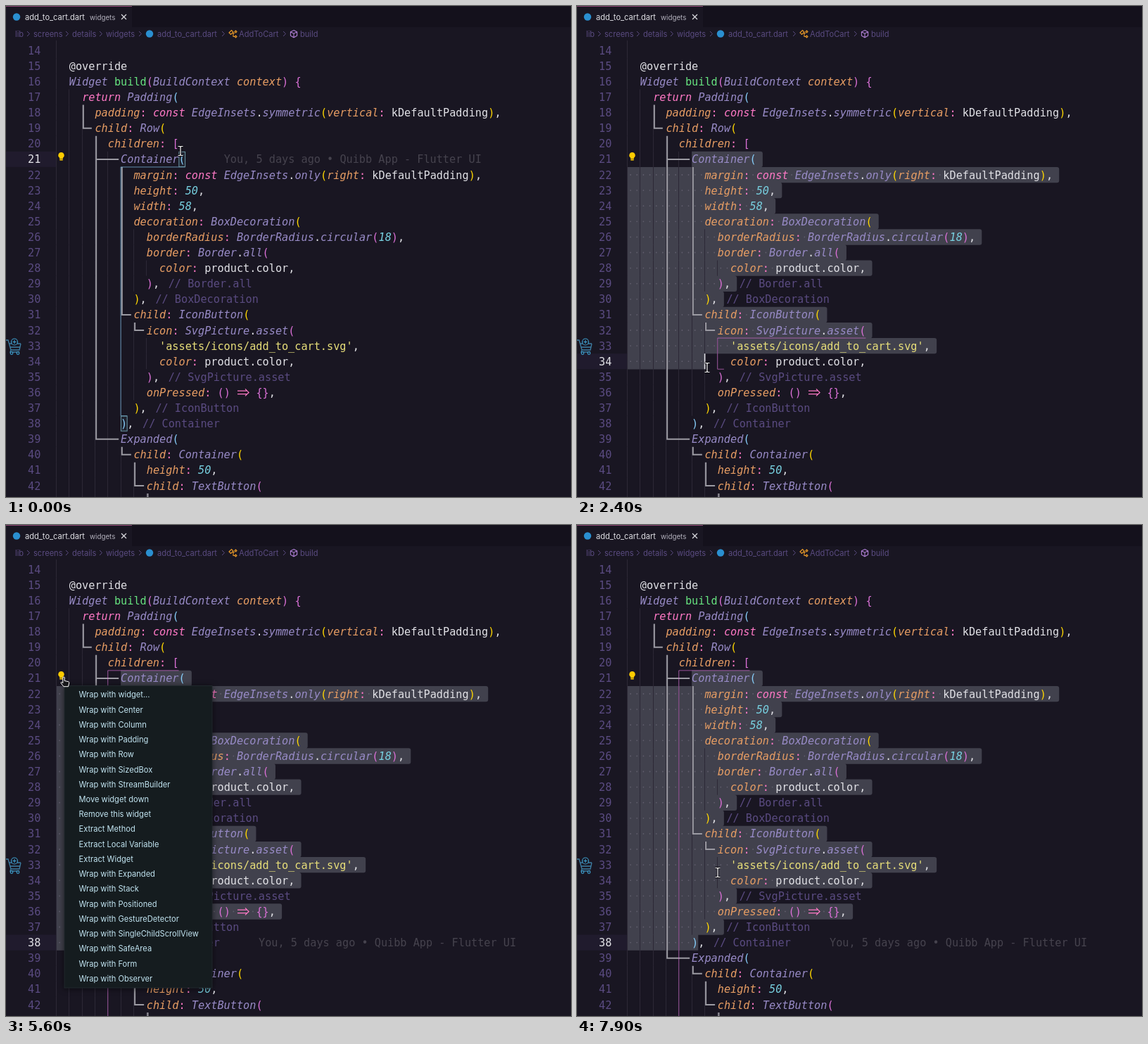
Animation of 803x698 px, one loop 8 s. Source, as an HTML page:

```html
<!DOCTYPE html>
<html lang="en">
<head>
<meta charset="utf-8">
<title>Editor</title>
<style>
  html, body { margin: 0; width: 100%; height: 100%; overflow: hidden; background: #191622; }
  svg { display: block; }
  .code { font: 15.215px "DejaVu Sans Mono", monospace; fill: #e1e1e6; }
  .ui { font: 11.1px Inter, sans-serif; }
  .it { font-style: italic; }
  .menu { filter: drop-shadow(0 1px 4px rgba(0, 0, 0, .6)); }
</style>
</head>
<body>
<svg id="stage" width="803" height="698" viewBox="0 0 803 698"></svg>
<script type="module">
const CHAR = 9.16, ROW = 22.1, LOOP = 8000, STEP = 100;
const X = col => 71.5 + col * CHAR;
const Y = line => 63.2 + (line - 14) * ROW;
const rowTop = line => Y(line) - ROW / 2;

const C = {
  text: '#e1e1e6', dim: '#5a4b81', type: '#988bc7', prop: '#e89e64', key: '#ff79c6',
  num: '#78d1e1', str: '#e7de79', fn: '#67e480', faint: '#46434e',
  gold: '#ffd700', orchid: '#da70d6', sky: '#87cefa'
};

// Lines 14 onward: indent, code, closing label
const code = [
  [0, ''],
  [2, '@override'],
  [2, 'Widget build(BuildContext context) {'],
  [4, 'return Padding('],
  [6, 'padding: const EdgeInsets.symmetric(vertical: kDefaultPadding),'],
  [6, 'child: Row('],
  [8, 'children: ['],
  [10, 'Container('],
  [12, 'margin: const EdgeInsets.only(right: kDefaultPadding),'],
  [12, 'height: 50,'],
  [12, 'width: 58,'],
  [12, 'decoration: BoxDecoration('],
  [14, 'borderRadius: BorderRadius.circular(18),'],
  [14, 'border: Border.all('],
  [16, 'color: product.color,'],
  [14, '),', 'Border.all'],
  [12, '),', 'BoxDecoration'],
  [12, 'child: IconButton('],
  [14, 'icon: SvgPicture.asset('],
  [16, "'assets/icons/add_to_cart.svg',"],
  [16, 'color: product.color,'],
  [14, '),', 'SvgPicture.asset'],
  [14, 'onPressed: () => {},'],
  [12, '),', 'IconButton'],
  [10, '),', 'Container'],
  [10, 'Expanded('],
  [12, 'child: Container('],
  [14, 'height: 50,'],
  [14, 'child: TextButton('],
  [16, 'onPressed: () => {},']
];
const row = line => code[line - 14];
const endCol = line => row(line)[0] + row(line)[1].length;

const menuItems = ['Wrap with widget...', 'Wrap with Center', 'Wrap with Column', 'Wrap with Padding',
  'Wrap with Row', 'Wrap with SizedBox', 'Wrap with StreamBuilder', 'Move widget down',
  'Remove this widget', 'Extract Method', 'Extract Local Variable', 'Extract Widget',
  'Wrap with Expanded', 'Wrap with Stack', 'Wrap with Positioned', 'Wrap with GestureDetector',
  'Wrap with SingleChildScrollView', 'Wrap with SafeArea', 'Wrap with Form', 'Wrap with Observer'];
const ITEM = 21.24, MENU_TOP = 230.7;

// SVG helpers
const rect = (x, y, w, h, fill, more = '') =>
  `<rect x="${x}" y="${y}" width="${w}" height="${h}" fill="${fill}" ${more}/>`;
const path = (d, stroke, width = 1, more = '') =>
  `<path d="${d}" fill="none" stroke="${stroke}" stroke-width="${width}" ${more}/>`;
const dot = (x, y, r, fill) => `<circle cx="${x}" cy="${y}" r="${r}" fill="${fill}"/>`;
const mono = (x, line, s, fill, cls = '') =>
  `<text class="code ${cls}" x="${x}" y="${Y(line) + 5.5}" style="fill:${fill}">${s}</text>`;
const label = (x, y, s, fill, more = '') =>
  `<text class="ui" x="${x}" y="${y + 4}" fill="${fill}" ${more}>${s}</text>`;

const rules = [
  [/^'[^']*'/, C.str], [/^\d+/, C.num, 'it'], [/^=>/, C.key], [/^(const|return)\b/, C.key, 'it'],
  [/^\w+(?=:)/, C.prop, 'it'], [/^build\b/, C.fn], [/^context\b/, C.prop, 'it'],
  [/^[A-Z]\w*/, C.type, 'it'], [/^\w+(?=\()/, C.type, 'it'], [/^:/, C.key],
  [/^@?\w+/, C.text], [/^./, C.text]
];

let depth = 1;
function bracketColor(s) {
  if (')]}'.includes(s)) depth--;
  const color = [C.gold, C.orchid, C.sky][depth % 3];
  if ('([{'.includes(s)) depth++;
  return color;
}

function arrow(x, line) {
  const y = Y(line);
  return path(`M${x + 1} ${y - 2.3}h13M${x + 1} ${y + 2.3}h13M${x + 12} ${y - 5}l5 5l-5 5`, C.key, 1.3);
}

function codeLine([indent, src, note], i) {
  const line = i + 14;
  let out = '', col = indent, rest = src;
  while (rest) {
    const [re, color, cls] = rules.find(r => r[0].test(rest));
    const s = rest.match(re)[0];
    if (s === '=>') out += arrow(X(col), line);
    else if (s !== ' ') out += mono(X(col), line, s, /[()[\]{}]/.test(s[0]) ? bracketColor(s) : color, cls);
    col += s.length;
    rest = rest.slice(s.length);
  }
  if (note) out += mono(X(col + 1) + 3.5, line, '// ' + note, C.dim);
  return out;
}

function indentGuides() {
  let d = `M71.5 49V${rowTop(15)}`;
  code.forEach(([indent], i) => {
    for (let c = 0; c < indent; c += 2) d += `M${Math.floor(X(c)) + .5} ${rowTop(i + 14)}v${ROW}`;
  });
  return path(d, '#2c2836');
}

// Widget tree lines: column, first row, branch rows, branch length
function treeLines() {
  const tree = [[4, 18, [19], 12], [6, 20, [21, 39], 32], [10, 22, [31], 13], [12, 32, [32], 13],
    [10, 40, [40], 13], [12, 41, [42], 13], [14, 43, [44], 13]];
  const d = tree.map(([col, from, ends, len]) => {
    const x = X(col) + 1.7;
    return `M${x} ${rowTop(from)}V${Y(ends[ends.length - 1])}` +
      ends.map(e => `M${x - 1} ${Y(e)}h${len + 1}`).join('');
  }).join('');
  return path(d, '#9c9ba3', 2);
}

function bulb() {
  return `<path d="M78.5 208a4.3 4.3 0 0 0-2.4 7.8v1.6h4.8v-1.6a4.3 4.3 0 0 0-2.4-7.8z" fill="#ffcc00"/>` +
    rect(76.3, 218, 4.4, 1.5, '#ffcc00');
}

function cart() {
  return path('M0 475h3l4 14h12l2-9M4 480h4M16 480h5M6 485h14M7 489l-1 3h13', '#3d7ea3', 1.3) +
    `<g fill="#191622" stroke="#3d9bc9" stroke-width="1.2"><circle cx="12" cy="477.5" r="4.5"/>` +
    `<circle cx="8" cy="493.5" r="1.8"/><circle cx="17" cy="493.5" r="1.8"/></g>` +
    path('M9.5 477.5h5M12 475v5', '#3d9bc9', 1.2);
}

function header() {
  const crumbs = [[13, 'lib'], [39, 'screens'], [94, 'details'], [142, 'widgets'],
    [215, 'add_to_cart.dart'], [331, 'AddToCart'], [418, 'build']];
  const chevrons = [32, 87, 135, 191, 309, 396].map(x => `M${x - 2} 36l3.5 3.5l-3.5 3.5`).join('');
  return rect(0, 0, 803, 49, '#191622') + rect(179, 0, 624, 30, '#14111c') +
    rect(0, 0, 179, 1, '#8a4370') +
    dot(15, 15.5, 5.2, '#2a8fd0') + label(27, 15.5, 'add_to_cart.dart', C.text) +
    label(119, 15.5, 'widgets', '#b3b1bd', 'style="font-size:9.8px"') +
    path('M164 12l7 7m0-7l-7 7', C.text, 1.1) +
    crumbs.map(([x, s]) => label(x, 39.5, s, C.dim)).join('') + path(chevrons, C.dim) +
    dot(204, 39.5, 5.2, '#2a8fd0') +
    path('M317 38l3.5-3.5l2.5 2.5l-3.5 3.5zM322 38.5h3M323 38.5v5h2M325 36.5l1.5-1.5l1.5 1.5l-1.5 1.5zM325 43.5l1.5-1.5l1.5 1.5l-1.5 1.5z', '#ee9d28', 1.1) +
    path('M409 34.5l4.6 2.3v5.4l-4.6 2.6l-4.6-2.6v-5.4zM404.4 36.8l4.6 2.4l4.6-2.4M409 39.2v5.6', '#b180d7', 1.1);
}

// Bracket pairs: open line, open column, close line, close column, colour
const pairs = {
  list: [20, 18, 45, 8, C.orchid],
  box: [21, 19, 38, 10, C.sky],
  deco: [25, 37, 30, 12, C.gold],
  button: [31, 29, 37, 12, C.gold],
  svg: [32, 36, 35, 14, C.orchid]
};
function pairAt(line) {
  if (line === 21 || line === 38) return pairs.list;
  if (line < 26 || line === 31) return pairs.box;
  if (line < 31) return pairs.deco;
  return line > 32 && line < 36 ? pairs.svg : pairs.button;
}
function pairGuide([line, col, endLine, endCol, color]) {
  return path(`M${X(col + 1)} ${rowTop(line + 1)}H${X(endCol)}V${rowTop(endLine)}H${X(endCol + 1)}`,
    color, 1, 'opacity=".65"');
}

// Pointer moves: first step, last step, x, y, shape
const moves = [
  [0, 0, 248, 206, 'beam'], [1, 4, 167, 221, 'beam'], [7, 9, 162, 215, 'beam'],
  [13, 20, 187, 418, 'beam'], [21, 24, 185, 514, 'beam'], [38, 39, 173, 594, 'beam'],
  [40, 41, 199.5, 340, 'beam'], [43, 43, 199.5, 291, 'beam'], [45, 47, 94, 229, 'beam'],
  [50, 51, 87, 223, 'beam'], [52, 52, 83, 217, 'hand'], [54, 54, 82, 216, 'hand'],
  [62, 62, 82, 218, 'arrow'], [64, 64, 176, 357.5, 'arrow'], [66, 66, 191, 419, 'arrow'],
  [68, 69, 197, 476, 'arrow'], [71, 71, 200, 489, 'arrow'], [73, 73, 203, 493, 'arrow'],
  [77, 77, 206, 499, 'beam'], [79, 79, 200, 494, 'beam']
];
function pointerAt(step) {
  const i = moves.findLastIndex(m => m[0] <= step);
  const [from, to, x, y, shape] = moves[i];
  const [, , px, py] = moves[Math.max(i - 1, 0)];
  const p = Math.min(1, (step - from + 1) / (to - from + 1));
  return { x: px + (x - px) * p, y: py + (y - py) * p, shape };
}
function pointer({ x, y, shape }) {
  const beam = 'M-3.5-6.5h2.5l1 1l1-1h2.5M0-5.5v11M-3.5 6.5h2.5l1-1l1 1h2.5';
  const art = {
    beam: path(beam, '#0b0910', 3) + path(beam, '#fff', 1.2),
    arrow: '<path d="M.5.5v12.5l3-2.7l2.2 4.8l2-.9l-2.1-4.7h4.2z" fill="#17181b" stroke="#fff"/>',
    hand: '<path d="M-1.2.5q1.3-1 2.4 0v5l5.5 1.2q1.3.4 1 2l-1.2 5h-6.5l-4-5q0-1.6 1.6-1l1.2 1z" fill="#17181b" stroke="#fff"/>'
  };
  return `<g transform="translate(${x} ${y})">${art[shape]}</g>`;
}

const dragLines = [21, 22, 23, 24, 25, 27, 28, 29, 30, 31, 33, 34];
function caretAt(step) {
  if (step < 13) return { line: 21, col: 20, selecting: false };
  const line = step < 38 ? dragLines[Math.min(step - 13, 11)] : step < 39 ? 36 : 38;
  return { line, col: { 21: 10, 38: 11 }[line] || 12, selecting: true };
}

function selection({ line, col }) {
  let bars = '', dots = '';
  for (let n = 21; n <= line && line > 21; n++) {
    const l = n === 21 ? X(10) : 71.5, last = n === line;
    const r = X(last ? col : endCol(n) + 1), k = last ? 0 : 3, t = rowTop(n), b = rowTop(n + 1) + .2;
    bars += `M${l} ${t}H${r - k}q${k} 0 ${k} ${k}V${b - k}q0 ${k} ${-k} ${k}H${l}z`;
    if (n === 21) continue;
    const src = ' '.repeat(row(n)[0]) + row(n)[1];
    [...src].forEach((ch, c) => {
      if (ch === ' ' && (!last || c < col)) dots += dot(X(c + .5), Y(n), .9, '#615e6d');
    });
  }
  return `<path d="${bars}" fill="#41414d"/>` + dots;
}

function menu({ x, y }) {
  const hover = x > 83 ? Math.floor((y - MENU_TOP) / ITEM) : -1;
  return rect(83, 228.5, 210, 429.5, '#151c1f', 'class="menu" stroke="#232c31" stroke-width=".8"') +
    menuItems.map((s, i) => {
      const t = MENU_TOP + i * ITEM, on = i === hover;
      return (on ? rect(83, t, 210, ITEM, '#bde6fa') : '') +
        label(103.5, t + ITEM / 2, s, on ? '#1b2a33' : '#c3e6f3');
    }).join('');
}

const blame = (x, line) => mono(x, line, 'You, 5 days ago • Quibb App - Flutter UI', C.faint);
const bracketBox = (line, col) =>
  rect(X(col) + .3, rowTop(line) + .5, CHAR - .4, ROW - 1, '#78d1e1', 'fill-opacity=".06" stroke="#6b98a6"');

const numbers = code.map((_, i) => mono(31, i + 14, i + 14, C.dim)).join('');
document.getElementById('stage').innerHTML =
  rect(0, 0, 803, 698, '#191622') + '<g id="under"></g>' + indentGuides() + treeLines() +
  '<g id="marks"></g>' + code.map(codeLine).join('') + cart() + bulb() + header() + '<g id="over"></g>';
const [under, marks, over] = ['under', 'marks', 'over'].map(id => document.getElementById(id));

function draw(step) {
  const caret = caretAt(step), mouse = pointerAt(step), { line, col, selecting } = caret;
  under.innerHTML = rect(0, rowTop(line), 71, ROW, '#201b2d') + numbers +
    rect(30, rowTop(line), 22, ROW, '#201b2d') + mono(31, line, line, C.text) +
    (selecting ? selection(caret) : '');

  let m = pairGuide(selecting ? pairAt(line) : pairs.box);
  if (!selecting) m += bracketBox(21, 19) + bracketBox(38, 10) + blame(X(26), 21);
  if (step >= 40) m += blame(359, 38);
  if (step >= 13 && step < 45 || step >= 50 && step < 56)
    m += rect(X(col) - .6, rowTop(line), 1.6, ROW, C.text);
  marks.innerHTML = m;

  over.innerHTML = (step >= 56 && step < 77 ? menu(mouse) : '') + pointer(mouse);
}

let shown = -1;
function tick() {
  const step = Math.floor(performance.now() % LOOP / STEP);
  if (step !== shown) draw(shown = step);
  requestAnimationFrame(tick);
}
tick();
</script>
</body>
</html>
```
